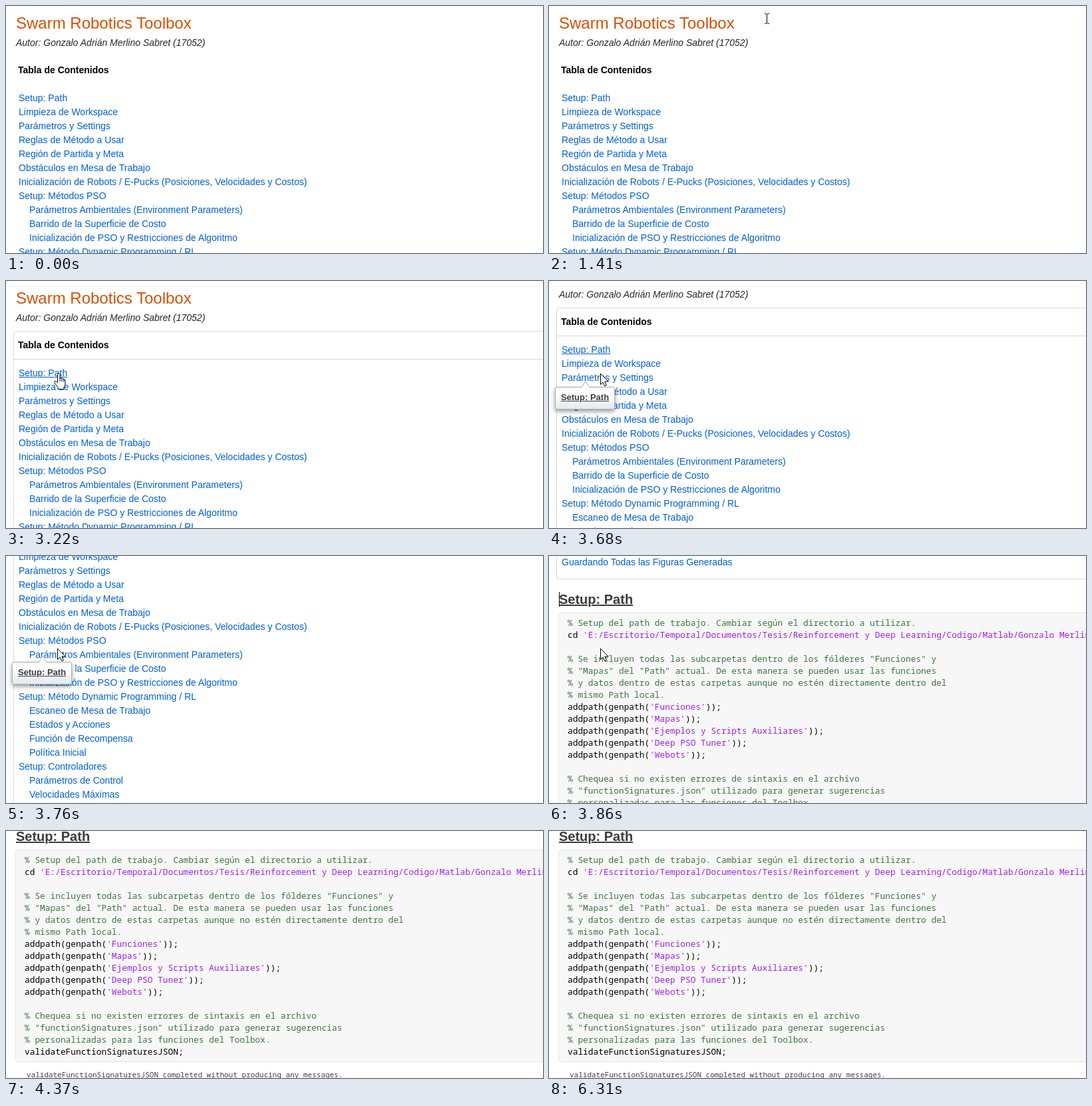
Recreate the animation shown at these times as an HTML page. Size 807 px wide and 371 px high, loop 6.41 s.

```html
<!DOCTYPE html>
<html lang="es">
<head>
<meta charset="utf-8">
<title>Swarm Robotics Toolbox</title>
<style>
  html, body { margin: 0; width: 100%; height: 100%; overflow: hidden; background: #fff; }
  body { position: relative; font: 14px/16px "Liberation Sans", Arial, sans-serif; white-space: pre; }
  #page, #page > *, #tip, #cursor { position: absolute; }
  #page { left: 0; top: 0; width: 100%; }
  #title { left: 15px; top: 12px; font-size: 24px; line-height: 27px; color: #d55000; }
  #author { left: 15px; top: 47px; font-style: italic; color: #262626; }
  #frame { left: 11px; top: 75px; right: -12px; border: 1px solid #d8d8d8; border-radius: 4px; box-sizing: border-box; }
  #frame::after { content: ""; position: absolute; left: 0; right: 0; top: 41px; height: 1px; background: #d8d8d8; }
  #label { left: 18px; top: 88px; font-weight: bold; color: #000; }
  #list { left: 19px; top: 128px; color: #005fce; }
  #list div { height: 21px; line-height: 20px; }
  #list .sub { padding-left: 16px; }
  #list .over { text-decoration: underline; }
  #head { left: 15px; font: bold 20px/22px "Liberation Sans", Arial, sans-serif; text-decoration: underline; color: #3c3c3c; }
  #caret { left: 15px; width: 1px; height: 22px; background: #000; }
  #code { left: 14px; right: -12px; height: 319px; box-sizing: border-box; padding: 5px 13px; overflow: hidden;
    border: 1px solid #e4e4e4; border-radius: 4px; background: #f7f7f7; color: #000; }
  #code, #out { font: 12.83px/18px "Noto Sans Mono", monospace; }
  #code i { font-style: normal; color: #3c763d; }
  #code b { font-weight: normal; color: #a020f0; }
  #out { left: 31px; font-size: 11px; line-height: 15px; color: #404040; }
  #tip { left: 9px; top: 159px; width: 90px; height: 34px; box-sizing: border-box; border: 1px solid #a9b0b8; border-radius: 3px;
    background: linear-gradient(#fff 30%, #e3eaf1); box-shadow: 0 3px 6px rgba(0,0,0,.4);
    font: bold 13px/30px "Liberation Sans", Arial, sans-serif; text-align: center; text-decoration: underline; color: #404040; }
  #tip svg { position: absolute; left: 38px; top: -11px; }
  #cursor { left: 0; top: 0; overflow: visible; }
  #cursor path { fill: #fff; stroke: #000; stroke-linejoin: round; }
  #cursor #beam { fill: none; }
</style>
</head>
<body>
<div id="page">
  <div id="frame"></div>
  <div id="title">Swarm Robotics Toolbox</div>
  <div id="author">Autor: Gonzalo Adrián Merlino Sabret (17052)</div>
  <div id="label">Tabla de Contenidos</div>
  <div id="list"></div>
  <div id="head">Setup: Path</div>
  <div id="caret"></div>
  <div id="code"></div>
  <div id="out">validateFunctionSignaturesJSON completed without producing any messages.</div>
</div>
<div id="tip"><svg width="14" height="11"><path d="M1 11L7 1L13 11" fill="#fff" stroke="#a9b0b8"/></svg>Setup: Path</div>
<svg id="cursor" width="1" height="1">
  <path id="beam" d="M-3 -7.5H-1L.5 -6.5L2 -7.5H4M.5 -6.5V6.5M-3 7.5H-1L.5 6.5L2 7.5H4"/>
  <path id="hand" d="M-1.5 11V1.5Q-1.5 -.5 .2 -.5T2 1.5V8Q2.2 6.5 3.6 6.6T5 8Q5.4 7 6.6 7.3T7.8 9Q10 8.2 10 11V16Q10 18.5 8 20.5V23.5H-1V21Q-2.5 19 -6 14Q-7 12 -5.4 11.3Q-4.2 10.8 -1.5 13.5ZM2 8V12M5 8V12M7.8 9V12.5"/>
  <path id="arrow" d="M-1.5 0V16.5L2.2 13L4.8 18.8L7.4 17.7L4.9 12H10.2Z"/>
</svg>
<script>
const $ = id => document.getElementById(id);
const LOOP = 6410;

// A leading ">" marks a second-level entry.
const entries = `Setup: Path
Limpieza de Workspace
Parámetros y Settings
Reglas de Método a Usar
Región de Partida y Meta
Obstáculos en Mesa de Trabajo
Inicialización de Robots / E-Pucks (Posiciones, Velocidades y Costos)
Setup: Métodos PSO
>Parámetros Ambientales (Environment Parameters)
>Barrido de la Superficie de Costo
>Inicialización de PSO y Restricciones de Algoritmo
Setup: Método Dynamic Programming / RL
>Escaneo de Mesa de Trabajo
>Estados y Acciones
>Función de Recompensa
>Política Inicial
Setup: Controladores
>Parámetros de Control
>Velocidades Máximas
Setup: Gráficas
>Colores y Marcadores
>Ejes y Etiquetas
>Captura de Video
Ciclo Principal
>Actualización de Posiciones
>Colisiones entre Robots
>Actualización de Costos
>Criterios de Convergencia
Análisis de Resultados
>Trayectorias de Robots
>Velocidades de Motores
>Evolución del Costo
>Error Final
Guardando Todas las Figuras Generadas`.split("\n");

const code = `% Setup del path de trabajo. Cambiar según el directorio a utilizar.
cd 'E:/Escritorio/Temporal/Documentos/Tesis/Reinforcement y Deep Learning/Codigo/Matlab/Gonzalo Merlino';

% Se incluyen todas las subcarpetas dentro de los fólderes "Funciones" y
% "Mapas" del "Path" actual. De esta manera se pueden usar las funciones
% y datos dentro de estas carpetas aunque no estén directamente dentro del
% mismo Path local.
addpath(genpath('Funciones'));
addpath(genpath('Mapas'));
addpath(genpath('Ejemplos y Scripts Auxiliares'));
addpath(genpath('Deep PSO Tuner'));
addpath(genpath('Webots'));

% Chequea si no existen errores de sintaxis en el archivo
% "functionSignatures.json" utilizado para generar sugerencias
% personalizadas para las funciones del Toolbox.
validateFunctionSignaturesJSON;`;

$("list").innerHTML = entries.map(s =>
  s[0] === ">" ? `<div class="sub">${s.slice(1)}</div>` : `<div>${s}</div>`).join("");
$("code").innerHTML = code.replace(/^%.*$|'[^']*'/gm, s =>
  s[0] === "%" ? `<i>${s}</i>` : `<b>${s}</b>`);

// Everything below the list hangs from the centre of its last entry.
const last = 138 + 21 * (entries.length - 1);
const bottom = last + 48;
$("frame").style.height = last + 26 - 75 + "px";
for (const [id, dy] of [["head", 45], ["caret", 45], ["code", 76], ["out", 406]])
  $(id).style.top = last + dy + "px";

const clamp = v => Math.min(1, Math.max(0, v));
const span = (t, a, b) => clamp((t - a) / (b - a));
const linear = k => k;
const out = k => 1 - (1 - k) ** 2;
const inOut = k => k * k * (3 - 2 * k);

// [start, end, x, y, easing]
const moves = [
  [560, 1180, 436, 19, linear],
  [1180, 1410, 326, 19, out],
  [1790, 2430, 214, 41, inOut],
  [2430, 3120, 81, 137, inOut],
  [3120, 3200, 79, 139, linear]
];

function pointer(t) {
  let x = 815, y = 300;
  for (const [a, b, px, py, ease] of moves) {
    const k = ease(span(t, a, b));
    x += (px - x) * k;
    y += (py - y) * k;
  }
  return [Math.round(x), Math.round(y)];
}

function scrollAt(t) {
  if (t < 3680) return 35 * span(t, 3610, 3680) ** 2;
  if (t < 3860) return 35 + (bottom - 92) * inOut(span(t, 3680, 3860));
  return bottom - 57 * (1 - span(t, 3860, 4355)) ** 3;
}

const show = (id, on) => { $(id).style.visibility = on ? "visible" : "hidden"; };
const within = (t, a, b) => t >= a && t < b;

function draw(now) {
  const t = Math.max(0, 35 + 45 * Math.floor((now - 35) / 45));
  const [x, y] = pointer(t);
  const over = y > 130 && t > 2480;
  const scrolling = t >= 3610;

  $("page").style.transform = `translateY(${-Math.round(scrollAt(t))}px)`;
  $("cursor").style.transform = `translate(${x}px,${y}px)`;
  $("list").firstChild.className = over ? "over" : "";
  show("frame", now >= 30 && y > 75);
  show("beam", within(t, 560, 4355) && !over);
  show("hand", over && !scrolling);
  show("arrow", scrolling && t < 4355);
  show("tip", within(t, 3455, 3815));
  $("tip").style.opacity = span(t, 3410, 3590);
  show("caret", within(now, 3610, 4355) || within(now, 4880, 5440) || within(now, 6050, 6310));
}

const start = performance.now();
function tick() {
  draw((performance.now() - start) % LOOP);
  requestAnimationFrame(tick);
}
tick();
</script>
</body>
</html>
```
